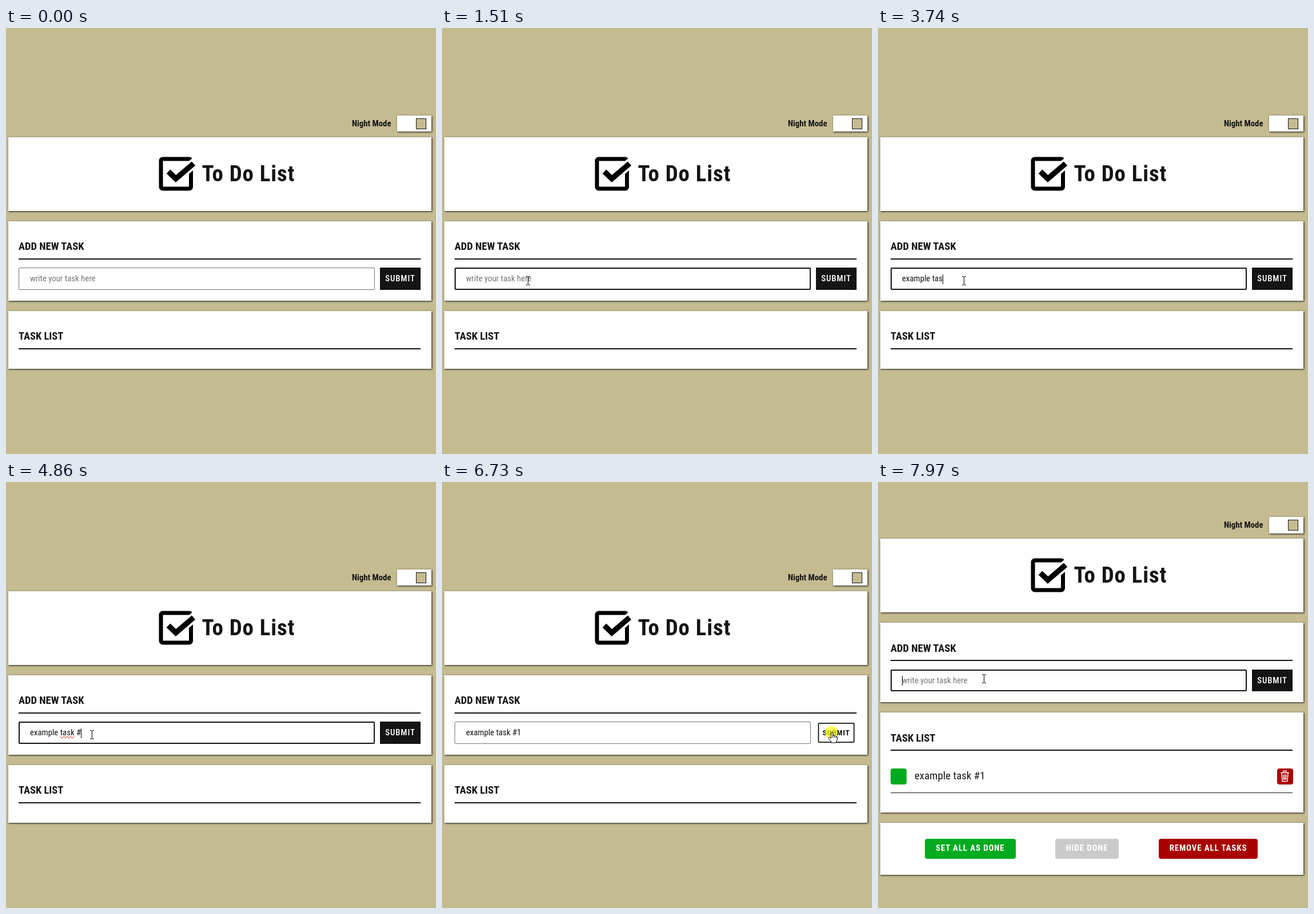
Recreate the animation shown at these times as an HTML page. Size 752 by 745 pixels, loop 8 s.

```html
<!DOCTYPE html>
<html lang="en">
<head>
<meta charset="utf-8">
<title>To Do List</title>
<style>
  html, body { margin: 0; width: 100%; height: 100%; overflow: hidden; background: #c4bb91; }
  body { position: relative; color: #141414; font: 400 14.8px/0 'Roboto Condensed', Roboto, sans-serif; font-stretch: condensed; }
  div, p, svg { position: absolute; box-sizing: border-box; margin: 0; }
  /* line-height is 0, so the top of a text is the middle of its capitals */
  p { white-space: pre; }
  b { font-weight: 700; }
  #page, #extra { left: 0; top: 0; }
  .card { left: 3.5px; width: 740.5px; background: #fff; box-shadow: 1px 1px 3px #141414; }
  .rule { left: 22px; width: 703px; height: 2px; background: #141414; }
  .heading { left: 22px; font-size: 18.5px; font-weight: 700; }
  .tile { width: 28px; height: 28px; border-radius: 4px; }
  .button { top: 624px; height: 35px; border-radius: 4px; color: #fff; font-weight: 700;
            letter-spacing: .925px; line-height: 33px; text-align: center; }
  #input { left: 22px; top: 419.3px; width: 623px; height: 38.7px; border: 1px solid #767676; border-radius: 2px; }
  #placeholder { color: #757575; }
  #caret { display: inline-block; width: 1px; height: 17px; margin: -9px -1px -9px 0; vertical-align: middle; background: #000; }
  .misspelt { text-decoration: underline wavy red 1px; text-decoration: spelling-error; }
  #submit { left: 654px; top: 419.3px; width: 71px; height: 38.7px; border: 2px solid #141414;
            letter-spacing: .925px; line-height: 34px; text-align: center; font-weight: 500; }
  #halo { width: 22px; height: 22px; border-radius: 50%; background: #ffff00b0; }
  .cursor { left: 0; top: 0; overflow: visible; }
</style>
</head>
<body>
<div id="page">
  <p style="left:605px;top:166.7px"><b>Night Mode</b></p>
  <div class="card" style="left:683.5px;top:152.7px;width:60.5px;height:28.5px"></div>
  <div style="left:717px;top:157.7px;width:18px;height:19px;border:1px solid #141414;background:#c4bb91"></div>

  <div class="card" style="top:190.7px;height:129px"></div>
  <svg style="left:262px;top:219.7px" width="75" height="70" fill="none" stroke="#000">
    <rect x="9" y="9" width="52.5" height="52" rx="3" stroke-width="7"/>
    <path d="M22 31 35 43.5 72 12" stroke="#fff" stroke-width="17"/>
    <path d="M22 31 35 43.5 66 17" stroke-width="9.5"/>
  </svg>
  <p style="left:342.5px;top:254.5px;font-size:38.85px;letter-spacing:.925px"><b>To Do List</b></p>

  <div class="card" style="top:337.7px;height:139px"></div>
  <p class="heading" style="top:382.3px">ADD NEW TASK</p>
  <div class="rule" style="top:402.7px"></div>
  <div id="input"></div>
  <p id="placeholder" style="left:42px;top:438.3px">write your task here</p>
  <p style="left:42px;top:438.3px"><span id="typed"></span><i id="caret"></i></p>
  <div id="submit">SUBMIT</div>

  <div class="card" id="list" style="top:494.7px"></div>
  <p class="heading" style="top:539.3px">TASK LIST</p>
  <div class="rule" style="top:559.7px"></div>
</div>

<div id="extra">
  <div class="tile" style="left:22px;top:500.5px;background:#00ab1f"></div>
  <p style="left:64px;top:514px;font-size:18.5px;letter-spacing:.2px">example task #1</p>
  <div class="tile" style="left:697.5px;top:500.5px;background:#a90000"></div>
  <svg style="left:698px;top:501px" width="28" height="28" fill="none" stroke="#fff" stroke-width="1.4">
    <path d="M6 7.5H21M11 7V4.5H16V7M8 8 9 22.5H18L19 8M11 10.5 11.5 20M13.5 10.5V20M16 10.5 15.5 20"/>
  </svg>
  <div class="rule" style="top:543px;height:1px"></div>
  <div class="card" style="top:596px;height:91px"></div>
  <div class="button" style="left:82px;width:158.5px;background:#00ab1f">SET ALL AS DONE</div>
  <div class="button" style="left:310px;width:111px;background:#cacaca">HIDE DONE</div>
  <div class="button" style="left:491px;width:173px;background:#a90000">REMOVE ALL TASKS</div>
</div>

<div id="halo"></div>
<svg class="cursor" id="arrow" width="1" height="1"><path d="M.5 .5V16.5L4 13 6.5 18.5 9 17.5 6.6 12H11Z" fill="#fff" stroke="#000"/></svg>
<svg class="cursor" id="beam" width="1" height="1"><path d="M-3 -7.5H-1L.5 -6.5 2 -7.5H4M.5 -6.5V6.5M-3 7.5H-1L.5 6.5 2 7.5H4" fill="none" stroke="#000"/></svg>
<svg class="cursor" id="hand" width="1" height="1">
  <path d="M-1.5 11V1.5Q0 -1 1.5 1.5V7Q3 5 4.5 7.2 6 5.8 7.5 8 9.5 7 9.5 9.5V13L7.5 16.5V19H-1.5V17L-6 11.5Q-6.5 8.5 -3.5 10Z" fill="#fff" stroke="#000"/>
  <path d="M1.5 7V10M4.5 7.5V10.5M7.5 8.5V11" stroke="#000"/>
</svg>

<script>
const LOOP = 8000, ADDED = 6970, PRESS = 6730, FOCUS = 990;
const TEXT = 'example task #1';
const keyTimes = [1630, 1880, 2130, 2370, 2630, 2750, 2750, 2880, 3120, 3370, 3740, 3870, 4120, 4860, 5360];
const caretOff = [[1510, 1630], [4620, 4860], [5860, 6360], [7470, 7970]];

// The pointer jumps from one place to the next: time, x, y, shape
const pointer = [
  [0, 0, 0, ''], [260, 531, 724, 'arrow'], [370, 384, 669, 'arrow'],
  [510, 270, 580, 'arrow'], [640, 190, 495, 'arrow'], [740, 155, 452, 'beam'], [870, 151, 447, 'beam'],
  [990, 150, 442, 'beam'], [5610, 190, 446, 'beam'], [5730, 370, 485, 'arrow'], [5860, 530, 515, 'arrow'],
  [5970, 601, 521, 'arrow'], [6110, 645, 505, 'arrow'], [6240, 674, 465, 'arrow'], [6360, 682, 440, 'hand'],
  [6480, 682, 437, 'hand'], [6970, 681, 436, 'arrow'], [7220, 655, 436, 'arrow'], [7350, 575, 436, 'arrow'],
  [7470, 483, 435, 'arrow'], [7610, 360, 410, 'arrow'], [7730, 260, 370, 'arrow'], [7860, 200, 348, 'beam'],
  [7970, 185, 344, 'beam']
];
// Submit button: time, background, text colour
const submitLook = [
  [0, '#141414', '#fff'], [6360, '#a0a0a0', '#444'], [6480, '#fff', '#141414'],
  [6970, '#a0a0a0', '#eee'], [7100, '#3c3c3c', '#fff'], [7220, '#141414', '#fff']
];

const $ = id => document.getElementById(id);
const show = (id, on) => $(id).style.display = on ? '' : 'none';
const within = (t, from, to) => t >= from && t < to;
const latest = (rows, t) => rows.findLast(row => row[0] <= t);

function drawInput(t, added) {
  const count = added ? 0 : keyTimes.filter(k => k <= t).length;
  const focused = within(t, FOCUS, PRESS) || added;
  const hovered = within(t, 740, FOCUS);
  const typed = TEXT.slice(0, count);
  const marked = focused && count > 12;
  $('typed').innerHTML = marked ? typed.replace('task', '<span class="misspelt">task</span>') : typed;
  show('placeholder', !count);
  show('caret', focused && !caretOff.some(([from, to]) => within(t, from, to)));
  $('input').style.border = focused ? '2px solid #141414' : `1px solid ${hovered ? '#141414' : '#767676'}`;
}

function drawSubmit(t) {
  const [, background, color] = latest(submitLook, t);
  const pressed = within(t, PRESS, ADDED), hover = within(t, 6480, ADDED);
  Object.assign($('submit').style, {
    background, color,
    borderColor: hover ? '#141414' : background,
    borderRadius: hover ? '3px' : '0',
    fontWeight: hover ? 700 : 500,
    transform: pressed ? 'scale(.9)' : 'none'
  });
}

function drawPointer(t) {
  const [, x, y, shape] = latest(pointer, t);
  for (const id of ['arrow', 'beam', 'hand']) {
    show(id, id === shape);
    $(id).style.translate = `${x}px ${y}px`;
  }
  show('halo', within(t, FOCUS, 1120) || within(t, PRESS, ADDED));
  $('halo').style.translate = `${x - 12}px ${y - 11 + (t >= PRESS)}px`;
}

function draw(t) {
  const added = t >= ADDED;
  $('page').style.top = added ? '-91.5px' : '0';
  $('list').style.height = added ? '175px' : '101px';
  show('extra', added);
  drawInput(t, added);
  drawSubmit(t);
  drawPointer(t);
}

function tick() {
  draw(performance.now() % LOOP);
  requestAnimationFrame(tick);
}
tick();
</script>
</body>
</html>
```
